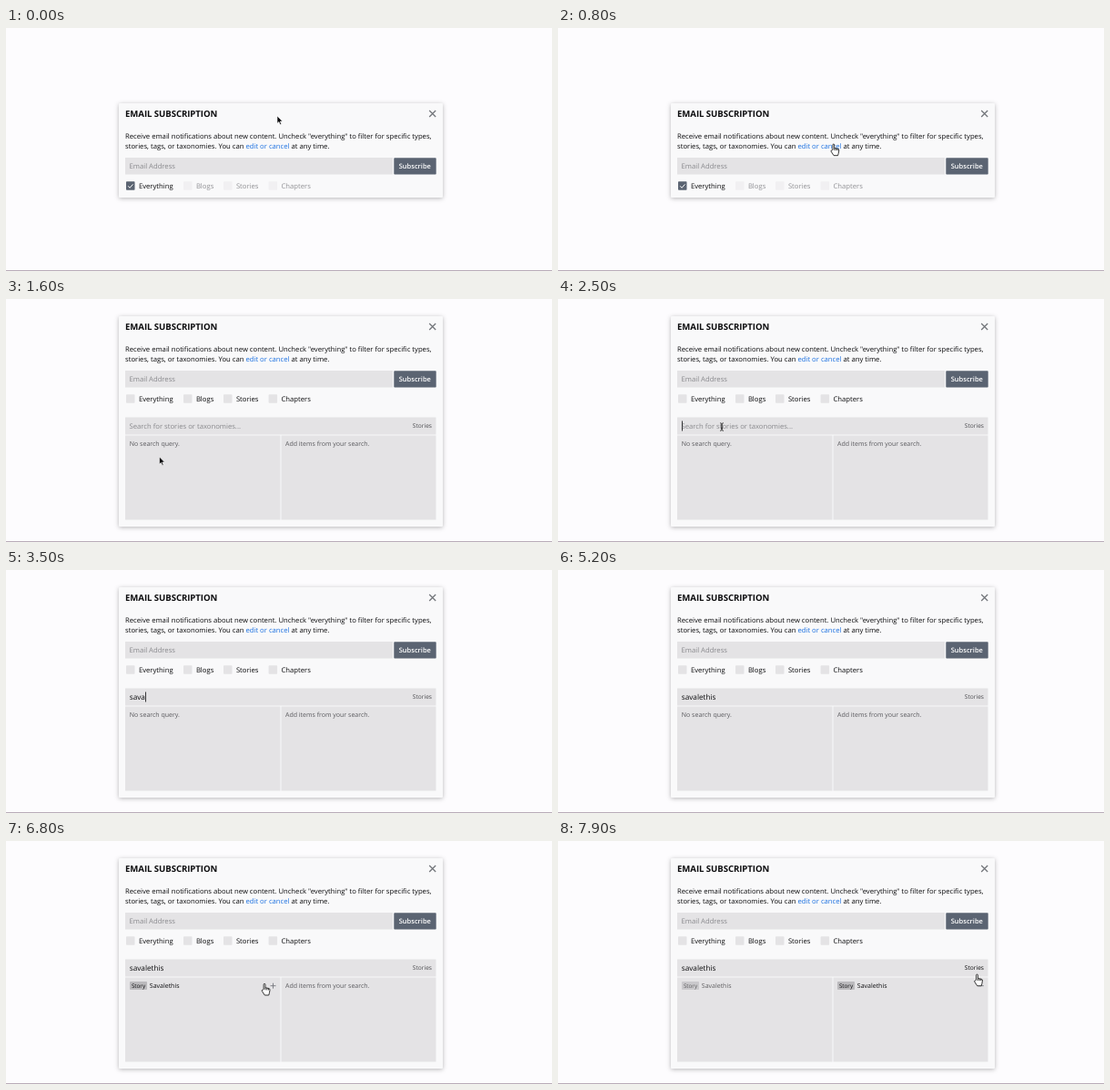
Recreate the animation shown at these times as an HTML page. Size 600 px wide and 268 px high, loop 8000 ms.

```html
<!DOCTYPE html>
<html lang="en">
<head>
<meta charset="utf-8">
<title>Email subscription</title>
<style>
  html, body { margin: 0; width: 100%; height: 100%; overflow: hidden; background: #fdfcfe; }
  svg {
    display: block; width: 600px; height: 268px; fill: #0b0b0d;
    font: 7.7px "Open Sans", sans-serif; text-rendering: geometricPrecision;
  }
  #card { fill: #f9f9fa; filter: drop-shadow(0 1px 2.5px rgba(0, 0, 0, .28)); }
  .field { fill: #e4e3e5; }
  .accent { fill: #5b6472; }
  .hint { fill: #88888c; }
  .small { font-size: 7px; }
  .note { font-size: 7px; fill: #58585c; }
  .tag { font-size: 6.3px; }
  .line { fill: none; stroke: #74777c; stroke-width: .9; }
  .close { stroke-width: 1.3; }
</style>
</head>
<body>
<svg viewBox="0 0 600 268">
  <rect y="267" width="600" height="1" fill="#b9acb8"/>
  <g id="dialog">
    <rect id="card" x="124" y="19" width="356" height="104" rx="1"/>
    <text x="131" y="34" font-size="9.6" font-weight="700" letter-spacing="-.05">EMAIL SUBSCRIPTION</text>
    <path class="line close" d="M465.2 27l7 7m0-7l-7 7"/>
    <text x="131" y="58.2">Receive email notifications about new content. Uncheck "everything" to filter for specific types,</text>
    <text x="131" y="69.1">stories, tags, or taxonomies. You can <tspan fill="#1a6fe0" font-weight="500">edit or cancel</tspan> at any time.</text>
    <rect class="field" x="131" y="79" width="294" height="18.5"/>
    <text class="hint" x="135.5" y="91.1">Email Address</text>
    <rect class="accent" x="426.3" y="79.3" width="46.4" height="18.3" rx=".8"/>
    <text x="449.3" y="91" text-anchor="middle" font-size="7.5" font-weight="600" fill="#fff">Subscribe</text>
    <g id="options"></g>
    <path id="check" d="M134.2 110.3l1.9 2 3.4-3.9" fill="none" stroke="#fff" stroke-width="1"/>
    <g id="search">
      <rect class="field" x="131" y="130.5" width="341.5" height="19"/>
      <rect class="field" x="131" y="150.5" width="170.5" height="93"/>
      <rect class="field" x="302.5" y="150.5" width="170" height="93"/>
      <text id="hint" class="hint" x="135.5" y="143">Search for stories or taxonomies...</text>
      <text id="query" x="135.8" y="143.1" font-size="8.2"></text>
      <rect id="caret" y="134.5" width=".8" height="11"/>
      <text id="kind" x="468" y="142.4" text-anchor="end" font-size="6.6">Stories</text>
      <text id="noQuery" class="note" x="135.8" y="162.2">No search query.</text>
      <text id="noItems" class="note" x="307" y="162.2">Add items from your search.</text>
      <g id="found">
        <rect x="136" y="155" width="19" height="9" rx=".8" fill="#bbbabd"/>
        <text class="tag" x="137.9" y="161.8">Story</text>
        <text class="small" x="157.8" y="162.2">Savalethis</text>
      </g>
      <path id="plus" class="line" d="M290.5 159.7h6m-3-3v6"/>
      <g id="added">
        <rect x="307" y="155" width="19" height="9" rx=".8" fill="#bbbabd"/>
        <text class="tag" x="308.9" y="161.8">Story</text>
        <text class="small" x="328.8" y="162.2">Savalethis</text>
        <path class="line" d="M461.8 159.7h6"/>
      </g>
    </g>
  </g>
  <g id="cursor">
    <path id="arrow" d="M0 0v8.3l1.9-1.8 1.3 3 1.4-.6-1.3-2.9h2.6z" stroke="#fff" stroke-width=".6"/>
    <path id="hand" transform="scale(1.12)" d="M-.8 5.6V1q0-.9.8-.9t.8.9v3l3.4.7q1.3.3 1.1 1.7l-.5 2.8-.6 2.2H.2L-2.4 7.4q-.5-1.1.5-1.1zM.8 4v2.3M2.5 4.5v1.9M4 4.8v1.6" fill="#fff" stroke="#111" stroke-width=".75"/>
    <path id="beam" d="M-2-4.2q2 0 2 1V3.3q0 1-2 1M2-4.2q-2 0-2 1V3.3q0 1 2 1M-1 1.4h2" fill="none" stroke="#222" stroke-width=".8"/>
  </g>
</svg>
<script>
const LOOP = 8000, STEP = 100, WORD = "savalethis";
const EXPAND = 1600, FOCUS = 2500, BLUR = 5200, RESULT = 5600, ADD = 7000;
const keyTimes = [3000, 3200, 3300, 3500, 3900, 4100, 4300, 4400, 4500, 4700];

// [time, x, y] of the pointer's hot spot
const path = [
  [0, 298, 97], [900, 303, 129], [1200, 168.5, 174], [2000, 168.5, 174], [2500, 180, 141],
  [5500, 180, 141], [5800, 190, 161], [6200, 207, 151], [6400, 207, 151],
  [6900, 293, 158], [7200, 293, 158], [7900, 460.5, 147]
];
const pointers = [
  [0, "arrow"], [700, "hand"], [1000, "arrow"], [1200, "hand"], [EXPAND, "arrow"], [2300, "beam"],
  [3000, ""], [5500, "beam"], [6700, "hand"], [7400, "arrow"], [7800, "hand"]
];
const labels = [["Everything", 132], ["Blogs", 195], ["Stories", 239], ["Chapters", 288.6]];

const $ = id => document.getElementById(id);
const show = (id, on) => $(id).setAttribute("display", on ? "inline" : "none");

$("options").innerHTML = labels.map(([name, x]) =>
  `<rect x="${x}" y="105.3" width="9.5" height="9.5" rx=".8"/><text x="${x + 13.9}" y="112.9">${name}</text>`).join("");
const boxes = [...document.querySelectorAll("#options rect")];
const names = [...document.querySelectorAll("#options text")];

function pointerAt(t) {
  const next = path.findIndex(p => p[0] > t);
  if (next < 0) return path.at(-1).slice(1);
  const [t0, x0, y0] = path[next - 1], [t1, x1, y1] = path[next];
  const u = (t - t0) / (t1 - t0), e = u * u * (3 - 2 * u);
  return [x0 + (x1 - x0) * e, y0 + (y1 - y0) * e];
}

function draw(t) {
  const open = t >= EXPAND, added = t >= ADD, found = t >= RESULT;
  $("dialog").setAttribute("transform", `translate(0 ${open ? 0 : 64})`);
  $("card").setAttribute("height", open ? 232 : 104);
  show("search", open);
  show("check", !open);
  boxes.forEach((box, i) => box.setAttribute("fill", open ? "#e4e3e5" : i ? "#f1f0f2" : "#5b6472"));
  names.forEach((name, i) => name.setAttribute("fill", open || !i ? "#0b0b0d" : "#919195"));

  const typed = keyTimes.filter(k => k <= t).length;
  $("query").textContent = WORD.slice(0, typed);
  show("hint", !typed);
  show("caret", t >= FOCUS && t < BLUR);
  $("caret").setAttribute("x", 136 + (open && typed ? $("query").getComputedTextLength() : 0));

  show("noQuery", !found);
  show("found", found);
  $("found").setAttribute("opacity", added ? .62 : 1);
  show("plus", found && !added);
  show("noItems", !added);
  show("added", added);
  $("kind").setAttribute("fill", t >= 7800 ? "#0b0b0d" : "#4c4c50");

  const active = pointers.findLast(p => p[0] <= t)[1];
  for (const id of ["arrow", "hand", "beam"]) show(id, id === active);
  $("cursor").setAttribute("transform", `translate(${pointerAt(t)})`);
}

const start = performance.now();
function tick() {
  const t = (performance.now() - start) % LOOP;
  draw(Math.floor(t / STEP) * STEP);
  requestAnimationFrame(tick);
}
tick();
</script>
</body>
</html>
```
